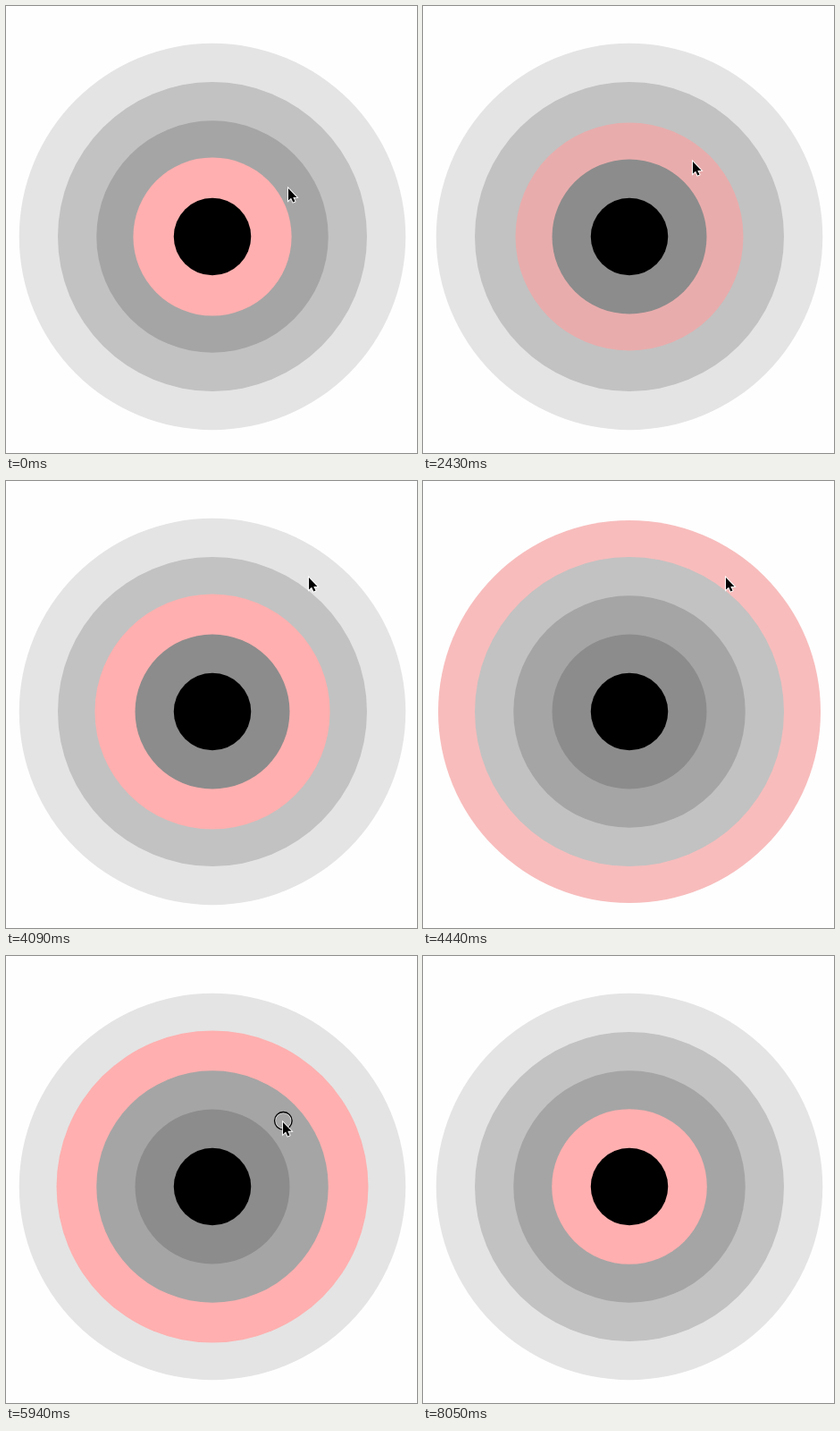
These frames come from a looping animation (460x500 px, 8150 ms). An HTML page with a canvas:

```html
<!DOCTYPE html>
<html lang="en">
<head>
<meta charset="utf-8">
<title>Pulsing rings</title>
<style>
  html, body { margin: 0; height: 100%; overflow: hidden; background: #fefefe; }
  canvas { display: block; }
</style>
</head>
<body>
<canvas width="460" height="500"></canvas>
<script>
const ctx = document.querySelector('canvas').getContext('2d');
const LOOP = 8150, HALF_PULSE = 704, FADE = 230;
const RINGS = 5, STEP = 43.25, SHRINK = -3, GROW = 5.2;
const PINK = 175;

// Pointer stops; those with a ring (counted from the middle) are clicks.
const stops = [
  { at: 0, x: 315, y: 203 },
  { at: 2292, x: 301, y: 173, ring: 2 },
  { at: 4302, x: 338, y: 107, ring: 4 },
  { at: 5100, x: 338, y: 107 },
  { at: 5568, x: 328, y: 147, ring: 3 },
  { at: 5990, x: 309, y: 185, ring: 2 },
  { at: 6335, x: 277, y: 278, ring: 1 },
  { at: 7020, x: 362, y: 502 }
];
const clicks = stops.filter(s => s.ring);

const arrow = new Path2D('M0 0V13.6L3.1 10.7L5.3 15.6L7.5 14.6L5.3 9.9H9.5Z');
const mix = (a, b, k) => a + (b - a) * k;
const clamp = k => Math.min(1, Math.max(0, k));
const smooth = k => (1 - Math.cos(Math.PI * k)) / 2;
const cubicInOut = k => k < 0.5 ? 4 * k ** 3 : 1 - 4 * (1 - k) ** 3;
const ringGray = i => i ? 228 * 0.85 ** (RINGS - 1 - i) : 0;

function circle(x, y, r) {
  ctx.beginPath();
  ctx.arc(x, y, r, 0, 2 * Math.PI);
}

function drawRings(t) {
  // Before the first click, the last one of the previous loop still counts.
  const click = clicks.findLast(c => c.at <= t) || clicks.at(-1);
  const age = (t - click.at + LOOP) % LOOP;
  for (let i = RINGS - 1; i >= 0; i--) {
    const active = i === click.ring;
    const fade = active ? cubicInOut(clamp(age / FADE)) : 0;
    const red = Math.round(mix(ringGray(i), 255, fade));
    const rest = Math.round(mix(ringGray(i), PINK, fade));
    const pulse = active ? mix(SHRINK, GROW, smooth(age / HALF_PULSE)) : 0;
    ctx.fillStyle = `rgb(${red}, ${rest}, ${rest})`;
    circle(231, 258, STEP * (i + 1) + pulse);
    ctx.fill();
  }
}

function drawClickMark(x, y) {
  circle(x, y, 8.7);
  ctx.lineWidth = 1;
  ctx.strokeStyle = '#ddd';
  ctx.stroke();
  circle(x, y, 9.8);
  ctx.lineWidth = 1.3;
  ctx.strokeStyle = '#000';
  ctx.stroke();
}

function drawPointer(t) {
  const next = stops.findIndex(s => s.at > t);
  if (next < 0) return;
  const from = stops[next - 1], to = stops[next];
  // Rest after a stop, then arrive shortly before the next one.
  const part = (t - from.at) / (to.at - from.at);
  const k = smooth(clamp((part - 0.34) / 0.56));
  const x = mix(from.x, to.x, k), y = mix(from.y, to.y, k);

  if (clicks.some(c => t > c.at - 90 && t < c.at + 30)) drawClickMark(x + 1.3, y - 0.6);

  ctx.save();
  ctx.translate(x + 1, y + 1);
  ctx.lineWidth = 1.8;
  ctx.strokeStyle = '#fff';
  ctx.stroke(arrow);
  ctx.fillStyle = '#000';
  ctx.fill(arrow);
  ctx.restore();
}

function frame() {
  const t = performance.now() % LOOP;
  ctx.fillStyle = '#fefefe';
  ctx.fillRect(0, 0, 460, 500);
  drawRings(t);
  drawPointer(t);
  requestAnimationFrame(frame);
}
frame();
</script>
</body>
</html>
```
